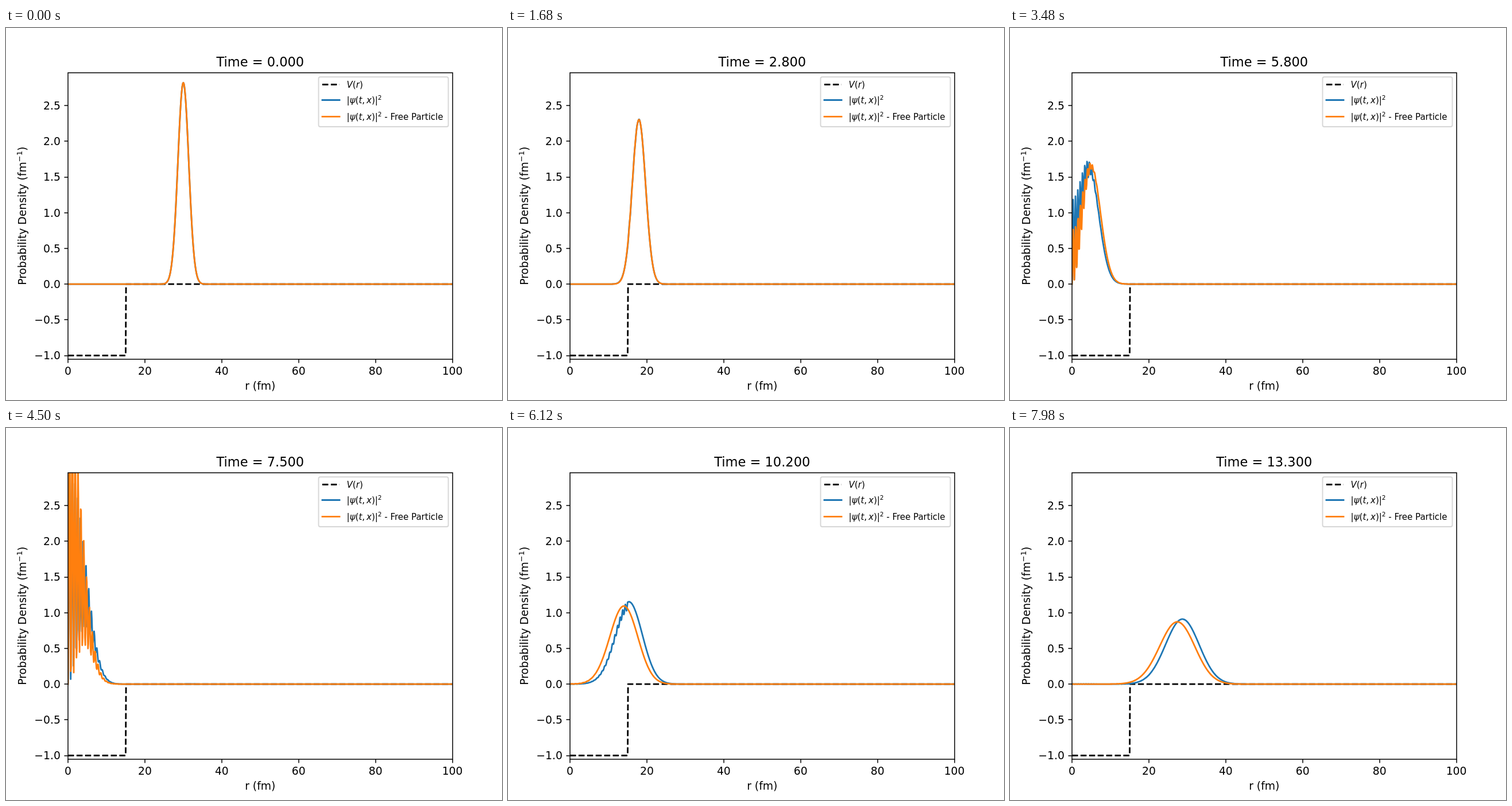
Animation, 864 px wide and 648 px high, one loop 8000 ms. Source, as an HTML page:

```html
<!DOCTYPE html>
<html lang="en">
<head>
<meta charset="utf-8">
<title>Wave packet on a square well</title>
<style>
  html, body { margin: 0; width: 100%; height: 100%; overflow: hidden; background: #fff; }
  svg { display: block; width: 864px; height: 648px; font-family: "DejaVu Sans", sans-serif; }
  .curve { fill: none; stroke-width: 2.81; stroke-linejoin: round; stroke-linecap: square; }
  .well { stroke: #000; stroke-dasharray: 10.41 4.5; stroke-linecap: butt; }
  .packet { stroke: #1f77b4; }
  .free { stroke: #ff7f0e; }
  .axis { fill: none; stroke: #000; stroke-width: 1.5; }
  .label { font-size: 18.75px; }
  .legend { font-size: 15px; }
  .sup { font-size: 10.5px; }
  i, .it { font-style: oblique; }
</style>
</head>
<body>
<svg viewBox="0 0 864 648" xmlns="http://www.w3.org/2000/svg">
  <clipPath id="box"><rect x="108" y="77.76" width="669.6" height="498.96"/></clipPath>
  <g clip-path="url(#box)">
    <path id="well" class="curve well"/>
    <path id="packet" class="curve packet"/>
    <path id="free" class="curve free"/>
  </g>
  <path id="ticks" class="axis"/>
  <rect class="axis" x="108" y="78" width="670" height="499"/>
  <g id="tickText" class="label"></g>
  <text id="title" x="442.8" y="66.5" font-size="22.5" text-anchor="middle"></text>
  <text class="label" x="442.8" y="629.7" text-anchor="middle">r (fm)</text>
  <text class="label" transform="translate(34.5 327.2) rotate(-90)" text-anchor="middle">Probability Density (fm<tspan font-size="13.1" dy="-7">−1</tspan><tspan dy="7">)</tspan></text>
  <g class="legend">
    <rect x="544.5" y="85.3" width="226" height="86.7" rx="3" fill="#fff" fill-opacity=".8" stroke="#ccc" stroke-opacity=".8" stroke-width="1.875"/>
    <path class="curve well" d="M551 98.5H581"/>
    <path class="curve packet" d="M551 125.5H581"/>
    <path class="curve free" d="M551 154.3H581"/>
    <text x="593.6" y="104"><tspan class="it">V</tspan>(<tspan class="it">r</tspan>)</text>
    <text id="psi" x="593.6" y="131">|<tspan class="it">ψ</tspan>(<tspan class="it">t</tspan>,<tspan class="it" dx="2.9">x</tspan>)|<tspan class="sup" dy="-5.7">2</tspan></text>
    <text x="593.6" y="159.7">|<tspan class="it">ψ</tspan>(<tspan class="it">t</tspan>,<tspan class="it" dx="2.9">x</tspan>)|<tspan class="sup" dy="-5.7">2</tspan><tspan dy="5.7"> - Free Particle</tspan></text>
  </g>
</svg>
<script>
const LOOP = 8000, STEP = 60, FRAMES = 134;
const N = 1000, DX = 0.1, DT = 0.005, SUB = 20;
const WELL = 150;                       // last grid point inside the well
const K = 4.46, CHIRP = 0.08, PEAK = 5 / Math.sqrt(Math.PI);

const $ = id => document.getElementById(id);
const px = r => 108 + r * 6.696;
const py = v => 446.13 - v * 124.37;

// Crank-Nicolson evolution with walls at both ends; returns |psi|^2 per frame
function evolve(depth) {
  const arr = () => new Float64Array(N + 1);
  const re = arr(), im = arr(), gr = arr(), gi = arr(), dr = arr(), di = arr();
  const off = -DT / (4 * DX * DX);
  for (let j = 1; j < N; j++) {
    const d = j * DX - 30;
    const amp = Math.sqrt(PEAK) * Math.exp(-d * d / 8);
    const phase = CHIRP * d * d / 8 - K * d;
    re[j] = amp * Math.cos(phase);
    im[j] = amp * Math.sin(phase);
    const v = j <= WELL ? depth : 0;
    const br = 1 + off * off * gr[j - 1];
    const bi = DT / 2 * (1 / (DX * DX) + v) + off * off * gi[j - 1];
    const m = br * br + bi * bi;
    gr[j] = br / m;
    gi[j] = -bi / m;
  }
  const advance = () => {
    for (let j = 1; j < N; j++) {
      const a = re[j] + off * di[j - 1], b = im[j] - off * dr[j - 1];
      dr[j] = a * gr[j] - b * gi[j];
      di[j] = a * gi[j] + b * gr[j];
    }
    let xr = 0, xi = 0;
    for (let j = N - 1; j > 0; j--) {
      const cr = -off * gi[j], ci = off * gr[j];
      const a = dr[j] - (cr * xr - ci * xi), b = di[j] - (cr * xi + ci * xr);
      xr = a;
      xi = b;
      re[j] = 2 * xr - re[j];
      im[j] = 2 * xi - im[j];
    }
  };
  const frames = [];
  for (let f = 0; f < FRAMES; f++) {
    if (f) for (let s = 0; s < SUB; s++) advance();
    frames.push(Float32Array.from(re, (a, j) => a * a + im[j] * im[j]));
  }
  return frames;
}

const line = values => "M" + Array.from(values, (v, j) =>
  px(j * DX).toFixed(2) + " " + py(v).toFixed(2)).join("L");

function drawAxes() {
  let ticks = "", text = "";
  for (let r = 0; r <= 100; r += 20) {
    ticks += `M${Math.round(px(r))} 577v6.56`;
    text += `<text x="${px(r)}" y="603.8" text-anchor="middle">${r}</text>`;
  }
  for (let v = -1; v <= 2.5; v += 0.5) {
    const y = py(v);
    ticks += `M108 ${Math.round(y)}h-6.56`;
    text += `<text x="94.9" y="${y + 6.8}" text-anchor="end">${v.toFixed(1).replace("-", "−")}</text>`;
  }
  $("ticks").setAttribute("d", ticks);
  $("tickText").innerHTML = text;
  $("well").setAttribute("d",
    `M${px(0)} ${py(-1)}L${px(WELL * DX)} ${py(-1)}L${px((WELL + 1) * DX)} ${py(0)}L${px(100)} ${py(0)}`);
}

const packet = evolve(-1), free = evolve(0);
let shown = -1;

function draw(ms) {
  const f = Math.min(FRAMES - 1, Math.floor(ms % LOOP / STEP));
  if (f === shown) return;
  shown = f;
  $("packet").setAttribute("d", line(packet[f]));
  $("free").setAttribute("d", line(free[f]));
  $("title").textContent = "Time = " + (f / 10).toFixed(3);
}

drawAxes();
draw(0);
const start = performance.now();
(function tick() {
  draw(performance.now() - start);
  requestAnimationFrame(tick);
})();
</script>
</body>
</html>
```
